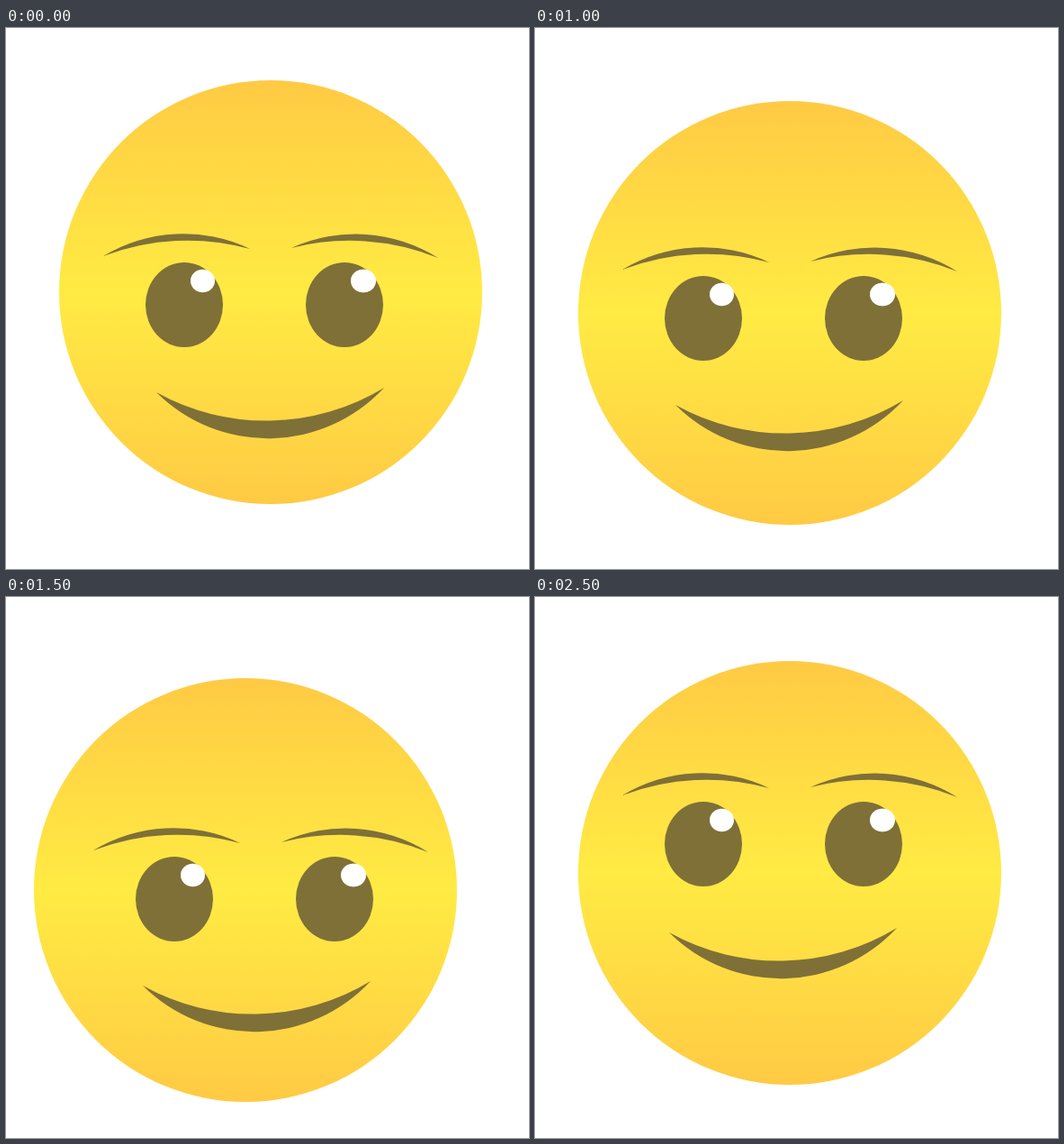
Animation of 581 by 600 pixels, one loop 3 s. Source, as an HTML page:

```html
<!DOCTYPE html>
<html lang="en">
<head>
<meta charset="utf-8">
<title>Smiley</title>
<style>
  html, body { margin: 0; width: 100%; height: 100%; overflow: hidden; background: #fff; }
  svg { display: block; width: 100vw; height: 100vh; }
  .dark { fill: #7f7038; }
  .head, .eyes, .smile, .smirk { animation: 3s step-end infinite; }
  .head { animation-name: head; }
  .eyes { animation-name: eyes; }
  .smile { animation-name: smile; }
  .smirk { animation-name: smirk; }

  /* Six held poses, 500 ms each */
  @keyframes head {
    0% { transform: none; }
    16.666% { transform: translate(25px, 6px); }
    33.333% { transform: translate(-11px, 23px); }
    50% { transform: translate(-28px, 32px); }
    66.666% { transform: translate(-11px, -8px); }
    83.333%, 100% { transform: translate(-11px, 13px); }
  }
  @keyframes eyes {
    0% { transform: none; }
    16.666% { transform: translate(-11px, 3px); }
    33.333% { transform: translate(-11px, 15px); }
    50% { transform: translate(-11px, 28px); }
    66.666% { transform: translate(-11px, 4px); }
    83.333%, 100% { transform: translate(-11px, -33px); }
  }
  @keyframes smile {
    0% { transform: none; visibility: visible; }
    16.666% { transform: none; visibility: hidden; }
    33.333% { transform: translate(-11px, 14px); visibility: visible; }
    50% { transform: translate(-15px, 27px); visibility: visible; }
    66.666% { transform: translate(-10px, 4px); visibility: visible; }
    83.333%, 100% { transform: translate(-18px, -32px); visibility: visible; }
  }
  @keyframes smirk {
    0% { visibility: hidden; }
    16.666% { visibility: visible; }
    33.333%, 100% { visibility: hidden; }
  }
</style>
</head>
<body>
<svg viewBox="0 0 581 600">
  <defs>
    <linearGradient id="skin" x2="0" y2="1">
      <stop offset="0" stop-color="#ffca44"/>
      <stop offset=".5" stop-color="#ffeb43"/>
      <stop offset="1" stop-color="#ffca44"/>
    </linearGradient>
    <g id="eye">
      <ellipse class="dark" cx="198" cy="307" rx="43" ry="47"/>
      <ellipse cx="218.5" cy="280.5" rx="13.5" ry="12.7" fill="#fff"/>
    </g>
  </defs>
  <circle class="head" cx="294" cy="293" r="235" fill="url(#skin)"/>
  <g class="eyes">
    <path class="dark" d="M108 253A172 172 0 0 1 271 245A262 262 0 0 0 108 253Z"/>
    <path class="dark" d="M317 244A172 172 0 0 1 480 255A262 262 0 0 0 317 244Z"/>
    <use href="#eye"/>
    <use href="#eye" x="178"/>
    <ellipse cx="397.5" cy="280.5" rx="13.5" ry="12.7" fill="#fff"/>
  </g>
  <path class="dark smile" d="M167 404A176 176 0 0 0 420 399A252 252 0 0 1 167 404Z"/>
  <path class="dark smirk" d="M197 436A192 192 0 0 0 355 436A893 893 0 0 1 197 436Z"/>
</svg>
</body>
</html>
```
